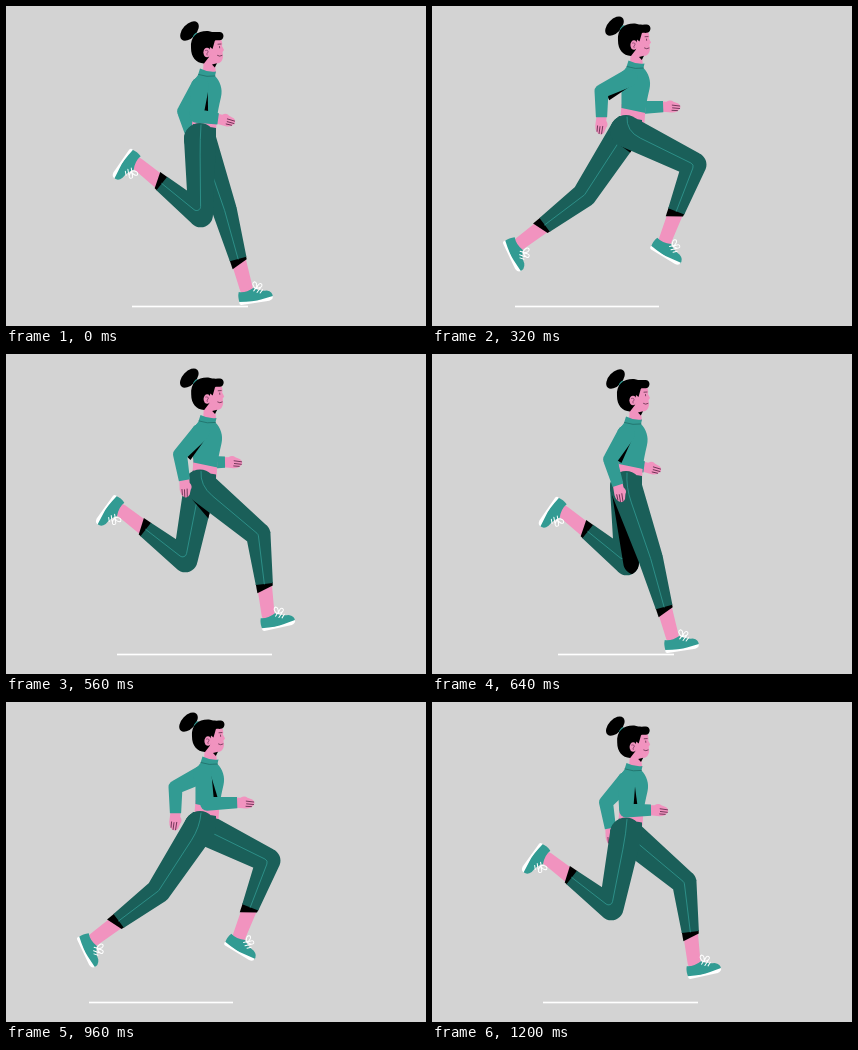
These frames come from a looping animation (420 px wide and 320 px high, 1.28 s). An HTML page with a canvas:

```html
<!DOCTYPE html>
<html lang="en">
<head>
<meta charset="utf-8">
<title>Runner</title>
<style>
html, body { margin: 0; width: 100%; height: 100%; overflow: hidden; background: #d3d3d3; }
canvas { display: block; width: 420px; height: 320px; }
</style>
</head>
<body>
<canvas id="stage"></canvas>
<script>
const STEP = 80, STEPS = 16, HALF = 8;
const BG = '#d3d3d3', SHIRT = '#329b93', PANTS = '#1a5f59', SKIN = '#f193bf', INK = '#000', WHITE = '#fff';
const THIGH = 76, SHIN = 81, CUFF = 50, UPPER_ARM = 30, HIP_X = 194;
const rad = Math.PI / 180;

// Smooth closed curve through key rows of [time, ...values]
function track(period, keys) {
  const n = keys.length;
  const key = i => {
    const turns = Math.floor(i / n), [t, ...v] = keys[i - turns * n];
    return { t: t + turns * period, v };
  };
  return time => {
    const t = time % period;
    let i = n - 1;
    while (keys[i][0] > t) i--;
    const [a, b, c, d] = [-1, 0, 1, 2].map(k => key(i + k));
    const w = c.t - b.t, u = (t - b.t) / w;
    return b.v.map((p, k) => {
      const q = c.v[k];
      const m = (q - a.v[k]) / (c.t - a.t) * w, o = (d.v[k] - p) / (d.t - b.t) * w;
      return p + u * (m + u * (3 * (q - p) - 2 * m - o + u * (2 * (p - q) + m + o)));
    });
  };
}

// Phase, then angles of thigh, shin and foot
const legPose = track(STEPS, [
  [0, 89.5, 219, 125], [2, 44.6, 135.5, 56], [4, 26.2, 111, 32],
  [6, 29, 91, -1], [7, 40, 83, -12], [8, 71, 74.5, -8],
  [10, 98, 102.5, 33], [12, 123, 143, 65], [14, 109, 199, 113]
]);

// Phase, angles of upper arm and forearm, visible forearm length
const armPose = track(STEPS, [
  [0, 97, 8, 22], [2, 135, 51, 23], [4, 154, 90, 26], [6, 142, 83, 25],
  [8, 122, 73, 27], [10, 94, 29, 23], [12, 81, -2, 30], [14, 88, -4, 28]
]);

// Phase, then both ends of the ground line
const ground = track(HALF, [[0, 126, 242], [2, 156, 209], [4, 83, 227], [6, 89, 259], [7, 111, 266]]);

// Height of the hop, 0 to 1: a quick rise, a long float and a sudden landing
const hop = step => Math.max(0, Math.sin(Math.PI * (step % HALF) / 7.02)) ** 0.35;

const canvas = document.getElementById('stage');
const c = canvas.getContext('2d');
const dpr = window.devicePixelRatio || 1;
canvas.width = 420 * dpr;
canvas.height = 320 * dpr;

function fill(shape, color) {
  c.fillStyle = color;
  c.fill(typeof shape === 'string' ? new Path2D(shape) : shape);
}

function line(shape, color, width) {
  c.strokeStyle = color;
  c.lineWidth = width;
  c.stroke(typeof shape === 'string' ? new Path2D(shape) : shape);
}

function oval(x, y, rx, ry, turn, color) {
  const p = new Path2D();
  p.ellipse(x, y, rx, ry, turn * rad, 0, 7);
  fill(p, color);
}

function at(x, y, angle, draw) {
  c.save();
  c.translate(x, y);
  c.rotate(angle * rad);
  draw();
  c.restore();
}

const move = ([x, y], angle, len) => [x + Math.cos(angle * rad) * len, y + Math.sin(angle * rad) * len];

// Adds a tapered segment to a path; the far end may stay flat
function limb(p, [x1, y1], r1, [x2, y2], r2, flat) {
  const a = Math.atan2(y2 - y1, x2 - x1), nx = -Math.sin(a), ny = Math.cos(a);
  p.moveTo(x1 - nx * r1, y1 - ny * r1);
  p.lineTo(x2 - nx * r2, y2 - ny * r2);
  p.lineTo(x2 + nx * r2, y2 + ny * r2);
  p.lineTo(x1 + nx * r1, y1 + ny * r1);
  p.closePath();
  p.moveTo(x1 + r1, y1);
  p.arc(x1, y1, r1, 0, 2 * Math.PI);
  if (flat) return;
  p.moveTo(x2 + r2, y2);
  p.arc(x2, y2, r2, 0, 2 * Math.PI);
}

function shoe() {
  fill('M-8 2 Q-1 4 7 0 Q12 4 20 4.5 Q26 6.5 25 12 L22 13.5 L-8.5 13.5 Q-10 7 -8 2Z', SHIRT);
  fill('M-9 12 Q6 14 13 12.6 L25.2 10.8 Q25.5 14 21 15 L-7 15.2 Q-9.5 15 -9 12Z', WHITE);
  line('M7 3 L11 -1 M10 5 L14 1 M13 6 L16 3 M9 1 Q5 -5 9 -6 Q12 -5 10 1 Q14 -6 16 -2 Q16 1 10 1', WHITE, 1);
}

function leg(phase, hipY, shadeAngle) {
  const [thigh, shin, foot] = legPose(phase);
  const hip = [HIP_X, hipY], knee = move(hip, thigh, THIGH);
  const cuff = move(knee, shin, CUFF), ankle = move(knee, shin, SHIN);

  const calf = new Path2D();
  limb(calf, cuff, 7.5, ankle, 6.5);
  fill(calf, SKIN);
  at(...ankle, foot, shoe);
  at(...cuff, shin, () => fill('M-1 -8.5 L2.5 -8.2 L8.5 8 L-1 8.5Z', INK));

  const pants = new Path2D(`M187 ${hipY - 15} L210 ${hipY - 11} L210 ${hipY} L180 ${hipY}Z`);
  limb(pants, hip, 16, knee, 12.3);
  limb(pants, knee, 12.3, cuff, 8.6, true);
  fill(pants, PANTS);

  const seam = new Path2D();
  seam.moveTo(HIP_X + 1, hipY - 14);
  seam.quadraticCurveTo(...hip, ...move(hip, thigh, 16));
  seam.arcTo(...knee, ...cuff, 4);
  seam.lineTo(...cuff);
  line(seam, SHIRT, 0.8);

  if (shadeAngle === undefined) return;
  const shade = new Path2D();
  limb(shade, hip, 15, move(hip, shadeAngle, THIGH), 12);
  c.save();
  c.clip(pants);
  fill(shade, INK);
  c.restore();
}

function hand() {
  fill('M-3 -5 L3 -5 Q7 -8 10 -5.5 L15 -4 Q18 -2 17 1 Q15 5 9 5.5 L-3 5Z', SKIN);
  line('M9 -2 L16.5 -1.5 M9.5 0.7 L16.5 1 M9 3.2 L14.5 3.2', '#5a2546', 0.8);
}

function arm(phase, lift, near) {
  const [upper, fore, reach] = armPose(phase);
  const shoulder = [194 + 2.5 * lift, 80 - 8 * lift];
  const elbow = move(shoulder, upper, UPPER_ARM), wrist = move(elbow, fore, reach);
  if (near) at(...shoulder, upper, () => fill('M2 -8 L27 -11.5 L27 -6Z', INK));
  at(...wrist, fore + 5, hand);
  const sleeve = new Path2D();
  limb(sleeve, shoulder, 9, elbow, 7);
  limb(sleeve, elbow, 7, wrist, 5.6, true);
  fill(sleeve, SHIRT);
}

function head(lift) {
  oval(183.5 - lift, 25 - 5 * lift, 11.5, 6.8, -47, INK);
  c.save();
  c.translate(lift, -7.5 * lift);
  oval(189.5, 30, 2, 3.6, 35, SHIRT);
  fill('M202 35 L214 32 Q217 36 216 40 L218 44 L216.5 46 L217 51 Q216 57 211 57.5 L209 58 L210 67 L197 65 L198 50Z', SKIN);
  fill('M185 42 C184 30 192 24.5 202 25 C207 26.5 210 26 214 26 C219 27 218 33 215 34 C211 35 209 33 208.5 36 L206.5 43 L204 41 L203 51 L198 57.5 C190 57 185 51 185 42Z', INK);
  oval(201, 46.5, 3.6, 4.8, 0, SKIN);
  line('M199.5 44.5 Q202.5 43.5 202 46.5 Q200 47 201 49', '#7b3560', 0.7);
  line('M212 38.2 L215 38 M213.5 40.5 L213.6 41.8 M211.5 49.5 Q213.5 51 216 49.5', '#4a2038', 0.7);
  fill('M206 58.5 L211 57.3 L208.8 61.5Z', INK);
  c.restore();
}

function torso(lift) {
  c.save();
  c.translate(2.5 * lift, -8 * lift);
  fill('M187 106 L211 109 L210 125 L186 120Z', SKIN);
  fill('M194 62.5 Q202 66.5 210 65.5 L209 70 C214 75 217 83 215 91 C213 100 211.5 106 211 115 L187 110 L187 90 Q182 80 192 69Z', SHIRT);
  line('M192.5 68.5 Q201 71.5 209 70', PANTS, 0.6);
  c.restore();
}

function draw(step) {
  const other = (step + HALF) % STEPS, lift = hop(step), hipY = 133 - 8 * lift;
  const [from, to] = ground(step);
  c.setTransform(dpr, 0, 0, dpr, 0, 0);
  c.lineCap = c.lineJoin = 'round';
  c.fillStyle = BG;
  c.fillRect(0, 0, 420, 320);
  c.fillStyle = WHITE;
  c.fillRect(from, 299.7, to - from, 1.6);

  // The near thigh shades the far leg while it swings ahead of it
  const nearThigh = legPose(step)[0], ahead = nearThigh < legPose(other)[0];

  arm(other, lift, false);
  leg(other, hipY, ahead ? nearThigh + 12 : undefined);
  head(lift);
  torso(lift);
  leg(step, hipY);
  arm(step, lift, true);
}

const start = performance.now();
function tick() {
  const t = Math.max(0, performance.now() - start);
  draw(Math.floor(t / STEP) % STEPS);
  requestAnimationFrame(tick);
}
tick();
</script>
</body>
</html>
```
